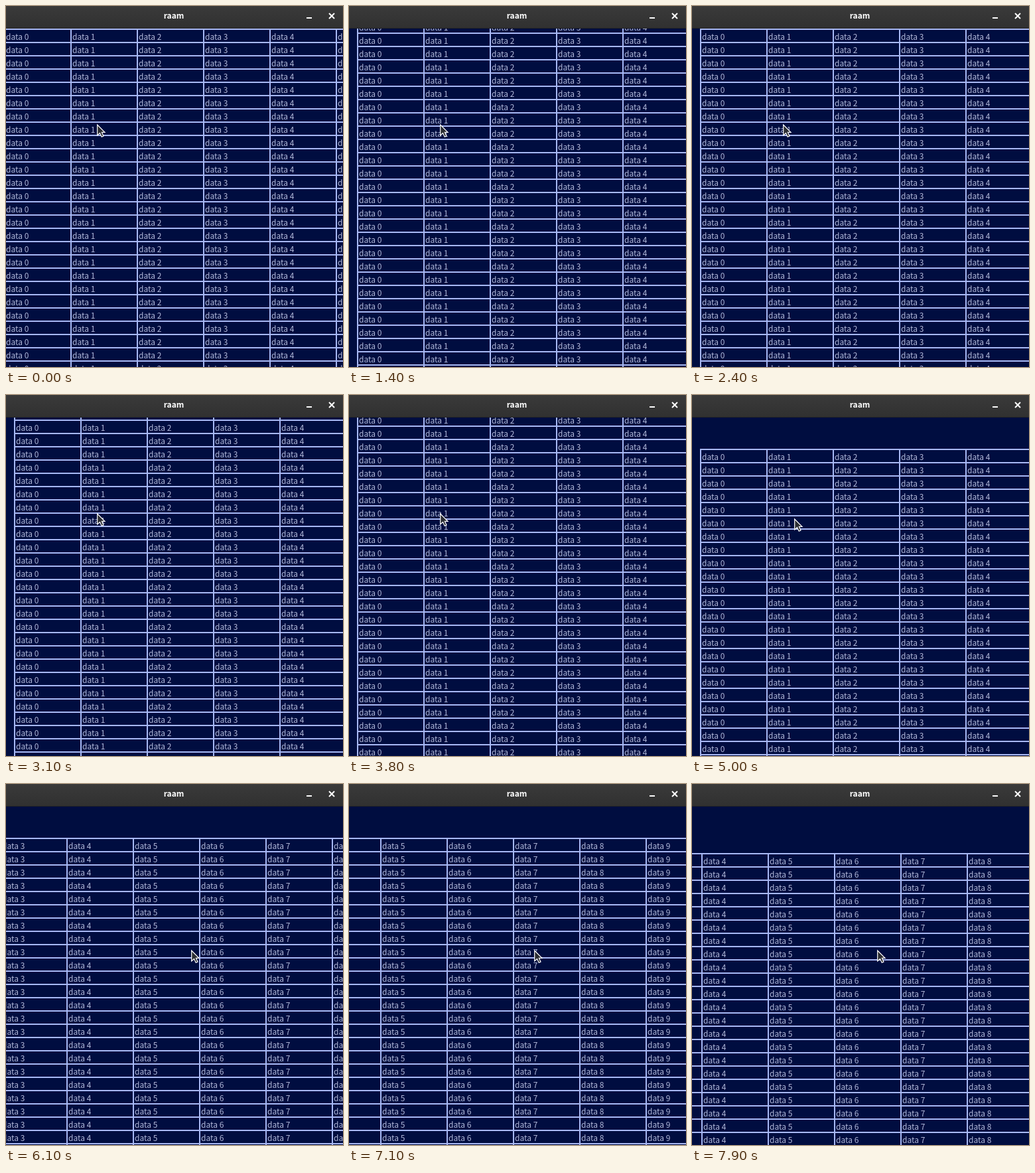
Write an HTML page with a canvas that moves like this. It is 508 by 544 pixels and loops after 8 s.

```html
<!DOCTYPE html>
<html lang="en">
<head>
<meta charset="utf-8">
<title>raam</title>
<style>
  html, body { margin: 0; width: 100%; height: 100%; overflow: hidden; background: #000d40; }
  canvas { display: block; }
</style>
</head>
<body>
<canvas id="stage" width="508" height="544"></canvas>
<script>
const ctx = document.getElementById('stage').getContext('2d');
const WIDTH = 508, HEIGHT = 544, BAR = 34;
const LOOP = 8000, TICK = 100;
const COLUMNS = 10, ROWS = 40, CELL_W = 100, CELL_H = 20;
const FONT = '"Noto Sans CJK JP", "Noto Sans CJK SC", "Noto Sans", sans-serif';

// Each gesture: start time, number of ticks, x and y reached.
const scrollStart = [-3, 0];
const scrolls = [
  [700, 3, 12, -4],
  [1400, 2, 12, -24],
  [1800, 2, 12, -48],
  [2200, 3, 12, -80],
  [2700, 1, 12, -92],
  [3000, 3, 12, -70],
  [3500, 2, 12, -40],
  [3800, 2, 12, -16],
  [4100, 3, 12, 13],
  [4600, 2, 12, 47],
  [5500, 3, -232, 47],
  [6100, 2, -386, 47],
  [6500, 2, -520, 47],
  [7100, 2, -386, 47],
  [7700, 1, -386, -6],
  [7800, 2, -386, 70],
];
const pointerStart = [137, 178];
const pointerMoves = [
  [5000, 1, 154, 186],
  [5100, 4, 279, 250],
];

function positionAt(time, start, gestures) {
  let [x, y] = start;
  for (const [begin, ticks, toX, toY] of gestures) {
    if (time < begin) break;
    const progress = Math.min(1, ((time - begin) / TICK + 1) / ticks);
    x += (toX - x) * progress;
    y += (toY - y) * progress;
  }
  return [Math.round(x), Math.round(y)];
}

function drawTable(left, offsetY) {
  const top = BAR + offsetY;
  const tableW = COLUMNS * CELL_W + 2, tableH = ROWS * CELL_H + 2;
  ctx.fillStyle = '#000d40';
  ctx.fillRect(0, BAR, WIDTH, HEIGHT - BAR);

  ctx.fillStyle = '#b3b9da';
  ctx.font = '12px ' + FONT;
  ctx.textAlign = 'left';
  for (let row = 0; row < ROWS; row++) {
    for (let col = 0; col < COLUMNS; col++) {
      ctx.fillText('data ' + col, left + col * CELL_W + 3, top + row * CELL_H + 17);
    }
  }

  ctx.fillStyle = '#a8b8f4';
  for (let col = 0; col <= COLUMNS; col++) ctx.fillRect(left + col * CELL_W, top, 2, tableH);
  for (let row = 0; row <= ROWS; row++) ctx.fillRect(left, top + row * CELL_H, tableW, 2);
}

function drawTitleBar() {
  const shade = ctx.createLinearGradient(0, 0, 0, BAR);
  shade.addColorStop(0, '#3a3a3a');
  shade.addColorStop(1, '#303030');
  ctx.fillStyle = shade;
  ctx.fillRect(0, 0, WIDTH, BAR);
  ctx.fillStyle = '#242424';
  ctx.fillRect(0, BAR - 1, WIDTH, 1);

  ctx.fillStyle = '#fff';
  ctx.font = 'bold 12px ' + FONT;
  ctx.textAlign = 'center';
  ctx.fillText('raam', 253, 19);
  ctx.fillRect(453, 17, 8, 2);

  ctx.strokeStyle = '#fff';
  ctx.lineWidth = 2;
  ctx.beginPath();
  ctx.moveTo(487, 11); ctx.lineTo(495, 19);
  ctx.moveTo(495, 11); ctx.lineTo(487, 19);
  ctx.stroke();
}

const arrow = new Path2D('M.7 1V17L4.5 13.6 7.2 19.2 10 17.9 7.4 12.3H12Z');

function drawPointer(x, y) {
  ctx.save();
  ctx.translate(x, y);
  ctx.fillStyle = '#2b2d31';
  ctx.strokeStyle = '#fff';
  ctx.lineWidth = 1.2;
  ctx.fill(arrow);
  ctx.stroke(arrow);
  ctx.restore();
}

function draw(now) {
  const time = Math.floor((now % LOOP) / TICK) * TICK;
  drawTable(...positionAt(time, scrollStart, scrolls));
  drawTitleBar();
  drawPointer(...positionAt(time, pointerStart, pointerMoves));
}

const begin = performance.now();
function frame() {
  draw(performance.now() - begin);
  requestAnimationFrame(frame);
}
frame();
</script>
</body>
</html>
```
